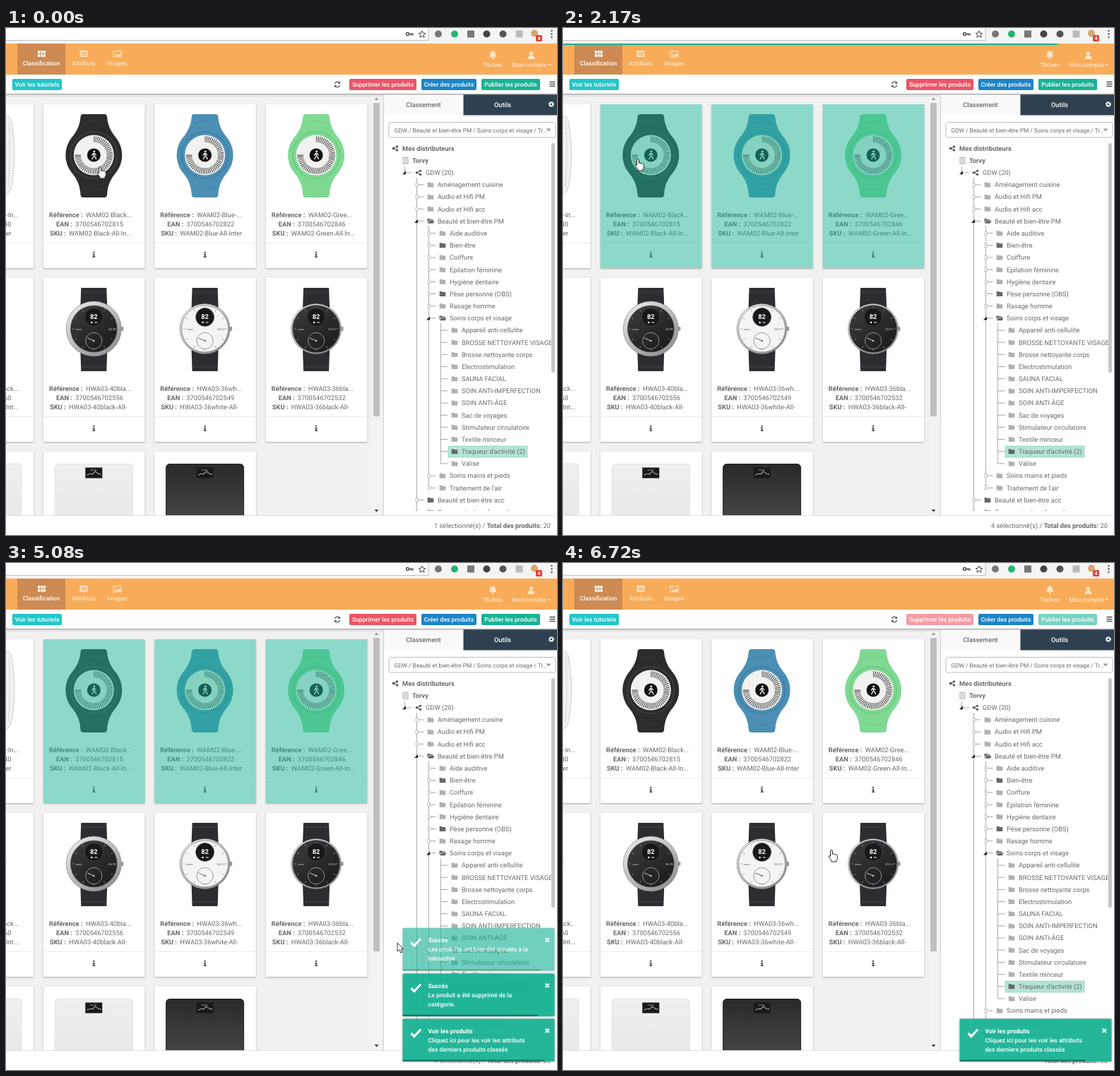
Animation of 780 by 718 pixels, one loop 6.79 s. Source, as an HTML page:

```html
<!DOCTYPE html>
<html lang="fr">
<head>
<meta charset="utf-8">
<title>Classement des produits</title>
<style>
html, body { margin: 0; width: 100%; height: 100%; overflow: hidden; background: #fff; }
svg { display: block; width: 780px; height: 718px; }
text { font-family: Roboto, Arial, sans-serif; font-size: 9.3px; fill: #676a6c; text-rendering: geometricPrecision; white-space: pre; }
.b { font-weight: 700; }
.m { font-weight: 500; }
.s { font-size: 8.6px; }
.w { fill: #fff; }
.c { text-anchor: middle; }
.e { text-anchor: end; }
.box { fill: #fff; filter: drop-shadow(0 1px 1.2px rgba(0,0,0,.3)); }
</style>
</head>
<body>
<svg id="stage" viewBox="0 0 780 718"></svg>
<script>
const TEAL = '#1ab394', LOOP = 6790, STEP = 78.05, LAST = 86;

const text = (x, y, str, cls = '', more = '') => `<text x="${x}" y="${y}" class="${cls}" ${more}>${str}</text>`;
const rect = (x, y, w, h, fill, more = '') => `<rect x="${x}" y="${y}" width="${w}" height="${h}" fill="${fill}" ${more}/>`;
const circle = (x, y, r, fill, more = '') => `<circle cx="${x}" cy="${y}" r="${r}" fill="${fill}" ${more}/>`;
const path = (d, fill, more = '') => `<path d="${d}" fill="${fill}" ${more}/>`;
const line = (d, color, w = 1, more = '') => path(d, 'none', `stroke="${color}" stroke-width="${w}" ${more}`);
const group = (x, y, inner, more = '') => `<g transform="translate(${x} ${y})" ${more}>${inner}</g>`;

/* products */
const GO_BODY = 'M-15-58H15Q18.5-58 18.8-54C19.5-43 24-33 32-24A40 40 0 0 1 32 24C24 33 19.5 43 18.8 56Q18.5 60 15 60H-15Q-18.5 60-18.8 56C-19.5 43-24 33-32 24A40 40 0 0 1-32-24C-24-33-19.5-43-18.8-54Q-18.5-58-15-58Z';

function goWatch(color, edge) {
  return path(GO_BODY, color) +
    line('M-14-45Q0-51 14-45M-14 46Q0 52 14 46', edge, 1.2, 'opacity=".4"') +
    circle(0, 0, 33, 'none', `stroke="${edge}" stroke-width="2" opacity=".5"`) +
    circle(0, 0, 28.5, '#f1f1ef') +
    line('M0-22.5A22.5 22.5 0 1 1-22.5 0', '#444', 8.5, 'stroke-dasharray="1 1.4"') +
    line('M-27 0H-18', '#333', .8) +
    circle(0, 0, 9.5, '#111') + circle(.6, -5, 1.4, '#fff') +
    line('M.3-3V1L2.5 3L3.4 6M.3 1L-2.6 6M-2.8 .5L-.8-2.3L1.5-2L3.4 0', '#fff', 1.3);
}

function hrWatch(r, ring, face, ink) {
  let ticks = '';
  for (let a = 0; a < 360; a += 30) ticks += `<path d="M0-${r - ring - 2}v3" stroke="${ink}" stroke-width=".7" opacity=".7" transform="rotate(${a})"/>`;
  return path('M-18-58H18L19-30H-19ZM-19 30H19L18 60H-18Z', '#2b2d31') +
    line('M-17-52H17M-17 54H17', '#45474c') +
    rect(r - 1, -3, 4, 6, '#9a9a9a', 'rx="1"') +
    circle(0, 0, r, 'url(#steel)', 'stroke="#777" stroke-width=".6"') +
    circle(0, 0, r - ring, face, 'stroke="#555" stroke-width=".5"') + ticks +
    circle(0, -16.5, 13, '#16181b', 'stroke="#555" stroke-width=".6"') +
    text(0, -14, '82', 'b w c') + circle(-3, -9, 1.3, '#fff') + line('M1-9h4', '#fff', 1) +
    circle(0, 17, 11.5, 'none', `stroke="${ink}" stroke-width=".9" stroke-dasharray="1.5 .5"`) +
    line('M0 17L-9 13', ink, 1) + circle(0, 17, 1.3, ink) +
    text(r - 13, 2, 'ZELTU', 'c', `style="font-size:3.8px;fill:${ink}"`) +
    line('M-26 1H-17', ink, .8);
}

const scale = (fill, edge) => rect(-55, -54.5, 110, 90, fill, `rx="5" stroke="${edge}"`) +
  rect(-12, -49.5, 24, 15, '#191919') +
  line('M-9-39l4-2l3 1l4-4l4 3l4 1', '#fff', 1.1, 'stroke-dasharray="1.6 1"') + line('M-5-46h9', '#aaa', .8);

function card(art, ref, ean, sku, id = '') {
  const row = (x, gap, y, label, val) => text(x, y, label + ' :', 'b') + text(x + gap, y, val);
  return `<g id="${id}"><rect class="box" width="143.5" height="232"/>` +
    group(71.3, 72, art, 'class="art"') +
    (ref ? row(8, 52, 159.5, 'Référence', ref) + row(18, 27, 172.5, 'EAN', ean) + row(9, 27, 185.5, 'SKU', sku) : '') +
    rect(0, 196, 143.5, .8, '#e4e6e8') +
    path('M69.5 211.7h3v4h1v1.4h-4.2v-1.4h1v-2.6h-.8z', '#555') + circle(71.3, 209.7, 1.2, '#555') + '</g>';
}

const colX = [53, 210.3, 367.8], rowY = [108, 354, 600];
const GOS = [
  [goWatch('#2c2c2e', '#4a4a4c'), 'WAM02-Black...', '3700546702815', 'WAM02-Black-All-In...'],
  [goWatch('#4b8fb4', '#3b7597'), 'WAM02-Blue-...', '3700546702822', 'WAM02-Blue-All-Inter'],
  [goWatch('#7fd993', '#62bd78'), 'WAM02-Gree...', '3700546702846', 'WAM02-Green-All-In...']];
const HRS = [
  [hrWatch(39, 6, 'url(#night)', '#ccc'), 'HWA03-40bla...', '3700546702556', 'HWA03-40black-All-'],
  [hrWatch(35.5, 2.5, '#f4f4f4', '#666'), 'HWA03-36wh...', '3700546702549', 'HWA03-36white-All-'],
  [hrWatch(35.5, 2, 'url(#night)', '#ccc'), 'HWA03-36bla...', '3700546702532', 'HWA03-36black-All-']];
const SCALES = [scale('url(#pale)', '#e2e2e2'), scale('url(#coal)', '#222')];

function shelf() {
  let out = rect(0, 94, 534, 597, '#f1f1f2');
  rowY.forEach((y, r) => {
    out += group(-104.5, y, '<rect class="box" width="143.5" height="232"/>' + rect(0, 196, 143.5, .8, '#e4e6e8'));
    [['ll-In...', '40', 'er'], ['ack...', '60', '-Int...'], []][r].forEach((t, i) =>
      out += text(t.length > 3 ? 18 : 7.5, y + 159.5 + 13 * i, t, 'e'));
  });
  out += path('M-5 125H4Q9 130 10 150Q14 180 10 210Q8 233 0 236', '#f2f2f2', 'stroke="#ccc"') +
    line('M4 135Q7 180 3 226', '#ccc', 1.5, 'stroke-dasharray="2 1.5"') +
    circle(-3, 425, 4, '#ddd') + rect(-40, 617, 62, 90, 'url(#pale)', 'rx="4" stroke="#e2e2e2"');
  GOS.forEach((g, i) => out += group(colX[i], rowY[0], card(...g, 'go' + i)));
  HRS.forEach((h, i) => out += group(colX[i], rowY[1], card(...h)));
  SCALES.forEach((s, i) => out += group(colX[i], rowY[2], card(s)));
  colX.forEach((x, i) => {
    out += `<rect id="tint${i}" x="${x}" y="108" width="143.5" height="232" fill="${TEAL}"/>`;
    out += group(x + 76.5, 174, `<rect class="spin" x="-16" y="-8" width="32" height="16" fill="${TEAL}"/>`);
  });
  return out + rect(519, 95, 11, 596, '#f3f3f3') + rect(520, 106, 9, 444, '#bfbfbf') +
    path('M521.5 102h6l-3-3.5z', '#999') + path('M521.5 682h6l-3 3.5z', '#444');
}

/* tree: level, label, folder style (0 pale, 1 dark, 2 open) */
const TREE = [
  [0, 'Mes distributeurs'], [1, 'Torvy'], [2, 'GDW (20)'],
  [3, 'Aménagement cuisine', 0], [3, 'Audio et Hifi PM', 0], [3, 'Audio et Hifi acc', 0], [3, 'Beauté et bien-être PM', 2],
  [4, 'Aide auditive', 0], [4, 'Bien-être', 1], [4, 'Coiffure', 0], [4, 'Epilation féminine', 0], [4, 'Hygiène dentaire', 0],
  [4, 'Pèse personne (OBS)', 1], [4, 'Rasage homme', 0], [4, 'Soins corps et visage', 2],
  [5, 'Appareil anti-cellulite', 0], [5, 'BROSSE NETTOYANTE VISAGE', 0], [5, 'Brosse nettoyante corps', 0],
  [5, 'Electrostimulation', 0], [5, 'SAUNA FACIAL', 0], [5, 'SOIN ANTI-IMPERFECTION', 0], [5, 'SOIN ANTI-ÂGE', 0],
  [5, 'Sac de voyages', 0], [5, 'Stimulateur circulatoire', 0], [5, 'Textile minceur', 0], [5, "Traqueur d'activité (2)", 1],
  [5, 'Valise', 0], [4, 'Soins mains et pieds', 0], [4, "Traitement de l'air", 0],
  [3, 'Beauté et bien-être acc', 1], [3, 'Communication domestique', 0]];
const INDENT = [561, 575, 594, 611, 628, 645];
const treeY = i => 170.5 + 17.17 * i;

const share = (x, y) => line(`M${x + 3} ${y - 2.6}L${x - 3} ${y}L${x + 3} ${y + 2.6}`, '#555', 1.1) +
  circle(x - 2.6, y, 1.7, '#555') + circle(x + 2.6, y - 2.6, 1.6, '#555') + circle(x + 2.6, y + 2.6, 1.6, '#555');

function folder(x, y, kind) {
  if (kind === 2) return group(x, y, path('M-4.5 2.5V-3.5h3l1 1h4v1.5h-6z', '#666') + path('M-3.8 3.3L-2-.4H5.6L3.6 3.3z', '#666'));
  return group(x, y, path('M-4.3-3.5h3.2l1 1h4.4v6h-8.6z', kind ? '#666' : '#b0b0b0'));
}

function tree() {
  let out = rect(626, 592, 112, 16, '#b5e3d9', 'stroke="#8fd0c1" stroke-width=".7"') +
    '<rect id="hover" x="627" width="114" height="15" fill="#1ab394" opacity=".12"/>' +
    line('M564.5 196V205h10M581.5 212V692M598.5 280V651M615.5 418V617', '#a5a5a5', .9);
  TREE.forEach(([lv, name, kind], i) => {
    const y = treeY(i), left = INDENT[lv];
    out += text(left, y + 3.3, name, lv < 2 ? 'b' : '');
    if (lv === 1) out += rect(562, y - 4.5, 7, 9, '#eee', 'stroke="#999" stroke-width=".8"') + line(`M564 ${y - 2}h3M564 ${y}h3M564 ${y + 2}h3`, '#aaa', .8);
    else if (lv === 0 || lv === 2) out += share(left - 10, y);
    else {
      out += folder(left - 10, y, kind) + line(`M${left - 29.5} ${y}h10`, '#999', .9);
      if (lv < 5 && kind !== 2) out += rect(left - 31, y - 2.5, 3, 5, '#fff', 'stroke="#aaa" stroke-width=".7"');
    }
    if (lv === 2 || kind === 2) out += path(`M${left - 33} ${y + 2.5}h5v-5z`, '#222');
  });
  return out;
}

const cog = (x, y) => circle(x, y, 2.3, 'none', 'stroke="#fff" stroke-width="1.6"') +
  circle(x, y, 3.5, 'none', 'stroke="#fff" stroke-width="1.2" stroke-dasharray="1.4 1.35"');

function panel() {
  return rect(534, 94, 246, 597, '#fff') + rect(534, 94, 114, 29, '#f9f9f9') + rect(647.5, 94, 133, 29.5, '#2f4050') +
    rect(534, 94, .9, 597, '#ccc') + text(591, 111.5, 'Classement', 'm c') + text(703, 111.5, 'Outils', 'm c w') + cog(772, 108) +
    rect(542, 133.5, 236, 21.5, '#fff', 'rx="2.5" stroke="#b5b5b5" stroke-width=".9"') +
    text(549.5, 147.5, 'GDW / Beauté et bien-être PM / Soins corps et visage / Tr...', '', 'style="font-size:8.3px"') +
    path('M764.5 142.5h7l-3.5 4z', '#999') +
    `<g clip-path="url(#treeClip)">${tree()}</g>` + rect(772, 163, 5, 325, '#c6c6c6', 'rx="2"');
}

const button = (x, w, fill, label, id = '') => `<g id="${id}">${rect(x, 72, w, 16, fill, 'rx="2"')}${text(x + w / 2, 82.7, label, 'm s w c')}</g>`;

function header() {
  const soft = '#fde4c6', nav = (x, y, s, fill) => text(x, y, s, 'm s c', `style="fill:${fill}"`);
  const grid = (x, f) => rect(x - 5, 32, 11, 9, f, 'rx="1"');
  let out = rect(0, 0, 780, 22, '#f4f4f4') + rect(-2, -2, 600, 19.5, '#fff', 'stroke="#bbb" stroke-width=".9"');
  out += circle(568.5, 8.5, 2, 'none', 'stroke="#444" stroke-width="1.3"') + line('M570.5 8.5h5.5v2.3M573.5 8.5v2', '#444', 1.3) +
    path('M589 4l1.4 3.2 3.5.3-2.7 2.3.9 3.5-3.1-1.9-3.1 1.9.9-3.5-2.7-2.3 3.5-.3z', 'none', 'stroke="#444"');
  out += circle(612, 8.5, 5, '#777') + circle(635, 8.5, 5, '#22b573') + rect(653, 3.5, 10, 10, '#777') +
    circle(680.5, 8.5, 5, '#444') + circle(703.5, 8.5, 5, '#555') + rect(721.5, 3.5, 10, 10, '#bbb') +
    circle(748, 7.5, 5, '#d9a66b') + rect(750, 10, 9, 9, '#e0443c', 'rx="1.5"') + text(754.5, 17.2, '4', 'b w c', 'style="font-size:7px"');
  [4, 8.5, 13].forEach(y => out += circle(772.5, y, 1.2, '#555'));
  out += rect(0, 22, 780, 44, '#f8ac59') + rect(16, 22, 68, 44, '#cd8b53');
  out += grid(50, '#fff') + line('M44 36.5h12M48.5 31v11M52.3 31v11', '#cd8b53', .9) + nav(50, 53.3, 'Classification', '#fff');
  out += grid(109.5, soft) + line('M105.5 35.4h9M105.5 38h9M109 34v6M112 34v6', '#f8ac59', .9) + nav(110, 53.3, 'Attributs', soft);
  out += rect(152, 32.5, 11, 8.5, 'none', `stroke="${soft}"`) + path('M153.5 40l3-3 2 1.5 2-3 2 2.5v2z', soft) + circle(155, 35, 1, soft) + nav(157.5, 53.3, 'Images', soft);
  out += path('M684 41q1.5-1.5 1.5-4.5a3.7 3.7 0 0 1 7.4 0q0 3 1.5 4.5z', soft) + circle(689.2, 42.5, 1.5, soft) + nav(689, 54.8, 'Tâches', soft);
  out += circle(743.5, 36, 2.6, soft) + path('M738.5 44q0-5 5-5t5 5z', soft) + nav(740.8, 54.8, 'Mon compte', soft) + path('M767 51h5l-2.5 2.8z', soft);
  out += `<rect id="load" y="22" height="2" width="0" fill="${TEAL}"/>`;
  out += rect(0, 66, 780, 27, '#fff') + rect(0, 93, 780, 1.4, '#a9a9a9') + rect(0, 94.4, 534, 3, '#000', 'opacity=".05"');
  out += button(9, 70, '#23c6c8', 'Voir les tutoriels') + button(486, 95, '#ed5565', 'Supprimer les produits', 'del') +
    button(588, 78, '#1c84c6', 'Créer des produits') + button(673, 83, TEAL, 'Publier les produits', 'pub');
  out += line('M465.5 79a3.7 3.7 0 0 1 6.8-1M472.7 81a3.7 3.7 0 0 1-6.8 1', '#555', 1.2) + path('M473 75.5v3.4h-3.4zM465 84.5v-3.4h3.4z', '#555');
  return out + line('M769.5 76.5h8M769.5 79.5h8M769.5 82.5h8', '#555', 1.3);
}

const footer = () => rect(0, 690.5, 780, 28, '#fff') + rect(0, 690, 780, .9, '#e0e0e0') +
  `<text x="771" y="707.6" class="e"><tspan id="count"></tspan><tspan class="b">Total des produits:</tspan> 20</text>`;

const TOASTS = [
  { y: 517, title: 'Succès', body: ['Les produits ont bien été ajoutés à la', 'hiérarchie'], start: 62, rate: .03,
    fade: [[62, 0], [65, .62], [68, .95], [78, .95], [82, .55], [85, 0]] },
  { y: 581.5, title: 'Succès', body: ['Le produit a été supprimé de la', 'catégorie.'], start: 54, rate: .01,
    fade: [[54, 0], [57, .97], [79, .97], [82, .4], [84, 0]] },
  { y: 645.5, title: 'Voir les produits', body: ['Cliquez ici pour les voir les attributs', 'des derniers produits classés'], start: 52, rate: .005,
    fade: [[52, 0], [55, .95]] }];

const toast = (t, i) => group(561.5, t.y, rect(0, 0, 215, 60.5, TEAL, 'rx="1.5" style="filter:drop-shadow(0 0 1.5px #999)"') +
  line('M12 20.5l4.5 4.5l9-10', '#fff', 3.2) +
  text(36, 20, t.title, 'b w s') + t.body.map((s, k) => text(36, 33 + 13 * k, s, 'w m s')).join('') +
  line('M202 14l5.5 5.5M207.5 14l-5.5 5.5', '#e6fff8', 2) +
  `<rect id="bar${i}" y="58" height="2.5" fill="#000" opacity=".35"/>`, `id="toast${i}"`);

const HAND = 'M-1.4 1.3Q0-.8 1.4 1.3V6.2Q3 5.2 4 6.6Q5.4 5.8 6.3 7.2Q8 6.6 8.4 8.6V11.5Q8.4 13.5 7 15V17H0V15.3Q-2.4 12.5-3.8 9.6Q-3.6 7.6-1.4 9.4Z';
const ARROW = 'M0 0V12L2.8 9.6L4.7 14L6.8 13L5 9H8.8Z';
const pile = [8, 5, 2.5].map(d => rect(d, d / 2, 71.5, 112, '#fff', 'stroke="#ddd" stroke-width=".6" opacity=".35"')).join('');

const grad = (id, a, b, x = .8) => `<linearGradient id="${id}" x2="${x}" y2="1"><stop stop-color="${a}"/><stop offset="1" stop-color="${b}"/></linearGradient>`;
document.getElementById('stage').innerHTML =
  '<defs>' + grad('steel', '#f2f2f2', '#8e8e90') + grad('night', '#3d3d3f', '#1b1b1d') +
  grad('coal', '#2a2a2b', '#4a4a4b', 0) + grad('pale', '#efeff0', '#e8e8ea', 0) +
  `<clipPath id="treeClip">${rect(534, 160, 246, 524)}</clipPath><clipPath id="dragClip">${rect(0, 94, 780, 597)}</clipPath></defs>` +
  shelf() + panel() + header() + footer() +
  `<g clip-path="url(#dragClip)"><g id="ghost">${pile}<use href="#go0" transform="scale(.5)" opacity=".78"/></g></g>` +
  TOASTS.map(toast).join('') +
  `<g id="pointer">${circle(.5, .5, 8.5, '#f0626a', 'id="press" opacity=".65"')}` +
  `<g id="badge">${circle(14, 11, 6.5, '#8b8b8b')}${text(14, 13.6, '4', 'b w c', 'style="font-size:7.5px"')}</g>` +
  path(HAND, '#fff', 'id="hand" stroke="#222" stroke-width="1"') + path(ARROW, '#fff', 'id="arrow" stroke="#222" stroke-width=".9"') + '</g>';

/* motion: keys are [step, value, ...] */
const MOVE = [[0, 133, 196], [3, 133, 196], [9, 250, 190], [15, 458, 184], [17, 466, 184], [20, 466, 184], [24, 300, 222], [28, 106, 185],
  [33, 106, 185], [35, 160, 176], [38, 400, 340], [41, 622, 548], [42, 632, 565], [43, 641, 582], [46, 654, 604], [59, 654, 604],
  [65, 554, 538], [68, 392, 423], [70, 380, 406]];
const LOAD = [[20, 0], [24, 430], [28, 700], [30, 780], [31, 0], [52, 0], [55, 480], [57, 780], [58, 0]];
const TINT = [[[1, 0], [4, .5], [83, .5], [86, 0]], [[14, 0], [18, .5], [83, .5], [86, 0]]];
const ART = [[69, 1], [72, 0], [83, 0], [85, 1]];
const BUTTON = [[83, 1], [86, .58]];

function at(keys, s, k = 1) {
  const n = keys.findIndex(p => p[0] > s);
  if (n < 0) return keys[keys.length - 1][k];
  if (n === 0) return keys[0][k];
  const a = keys[n - 1], b = keys[n];
  return a[k] + (b[k] - a[k]) * (s - a[0]) / (b[0] - a[0]);
}

const $ = id => document.getElementById(id);
const set = (id, name, value) => $(id).setAttribute(name, value);
const show = (id, on) => set(id, 'visibility', on ? 'visible' : 'hidden');
const arts = [0, 1, 2].map(i => $('go' + i).querySelector('.art'));
const spins = document.querySelectorAll('.spin');

function draw(s) {
  const x = at(MOVE, s), y = at(MOVE, s, 2), drag = s >= 34 && s < 53, arrow = s >= 61 && s < 68;
  set('pointer', 'transform', `translate(${x} ${y})`);
  set('ghost', 'transform', `translate(${x + 6} ${y})`);
  show('ghost', drag);
  show('badge', drag);
  show('press', s >= 33 && s < 51);
  show('arrow', arrow);
  show('hand', !arrow);

  const row = Math.round((at(MOVE, s - 1, 2) - 170.5) / 17.17);
  show('hover', s > 40 && s < 46);
  set('hover', 'y', treeY(row) - 7.5);

  set('load', 'width', at(LOAD, s));
  colX.forEach((_, i) => {
    set('tint' + i, 'opacity', at(TINT[i ? 1 : 0], s));
    arts[i].setAttribute('opacity', at(ART, s));
    spins[i].setAttribute('visibility', s >= 71 && s < 84 ? 'visible' : 'hidden');
    spins[i].setAttribute('transform', `rotate(45) scale(1 ${2 * Math.abs(Math.cos((s - 82) * .4 + 1.08))})`);
  });
  ['del', 'pub'].forEach(id => set(id, 'opacity', at(BUTTON, s)));
  const picked = s < 2 ? 1 : s < 15 ? 2 : s < 85 ? 4 : 0;
  $('count').textContent = picked ? picked + ' sélectionné(s) / ' : '';

  TOASTS.forEach((t, i) => {
    set('toast' + i, 'opacity', at(t.fade, s));
    set('bar' + i, 'width', 215 * Math.max(0, Math.min(1, 1 - (s - t.start) * t.rate)));
  });
}

const begin = performance.now();
function tick() {
  const t = (performance.now() - begin) % LOOP;
  draw(Math.min(LAST, Math.floor((t + 28) / STEP)));
  requestAnimationFrame(tick);
}
tick();
</script>
</body>
</html>
```
